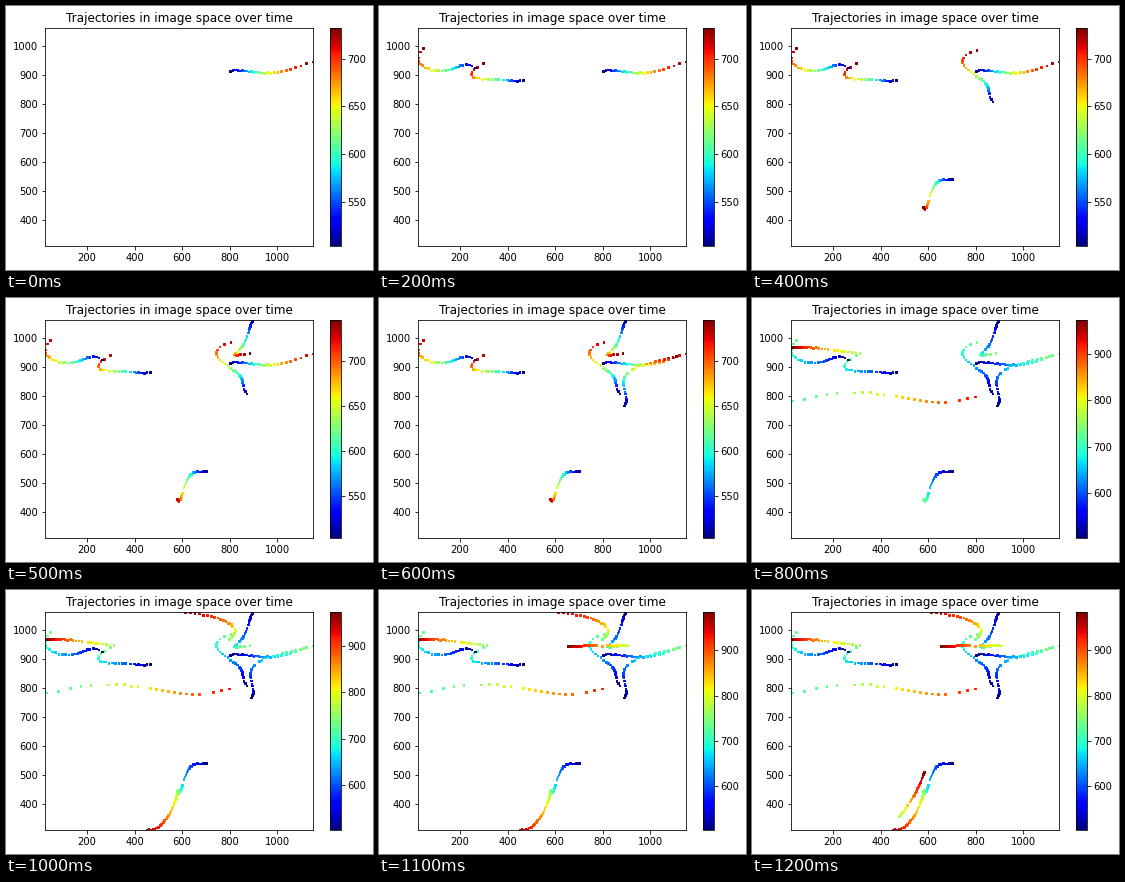
Animation, 367 px wide and 264 px high, one loop 1300 ms. Source, as a matplotlib script:

```python
import numpy as np
import matplotlib.pyplot as plt
from matplotlib.animation import FuncAnimation

W, H, DPI = 367, 264, 72
STEP_MS = 100
T_MIN = 504      # first video time on the colour scale
SAMPLE = 9       # time between two dots
DROP = 0.08      # share of missed detections
LEFT, TOP, AX_W, AX_H = 39.15, 22.2, 267.84, 217.44

plt.rcParams.update({"font.family": "DejaVu Sans", "font.size": 10})
rng = np.random.default_rng(4)


def track(t0, t1, *keys):
    """Dots along the polynomial through key points evenly spaced in time."""
    n = round((t1 - t0) / SAMPLE) + 1
    u = np.linspace(0, 1, n)
    knots = np.linspace(0, 1, len(keys))
    x, y = (np.polyval(np.polyfit(knots, v, len(keys) - 1), u)
            for v in zip(*keys))
    y = y + rng.normal(0, 1, n)
    seen = rng.random(n) > DROP
    seen[[0, -1]] = True
    return np.column_stack([x, y, t0 + (t1 - t0) * u])[seen]


tracks = [
    # approaching along each road
    track(504, 732, (800, 914), (883, 912), (979, 908), (1147, 947)),
    track(504, 732, (465, 881), (405, 881), (340, 884), (258, 893), (297, 940)),
    track(504, 732, (263, 925), (198, 931), (130, 915), (45, 930), (45, 992)),
    track(504, 732, (870, 808), (852, 850), (818, 887), (750, 931), (803, 987)),
    track(504, 732, (700, 541), (655, 538), (620, 512), (597, 458), (578, 443)),
    track(504, 745, (895, 1058), (877, 1020), (848, 970), (818, 942), (882, 946)),
    track(504, 745, (888, 767), (889, 822), (898, 876), (985, 912), (1108, 938)),
    # long sweep from left to right
    track(708, 924, (28, 782), (355, 811), (565, 785), (797, 798)),
    # leaving again
    track(755, 972, (312, 946), (140, 964), (28, 968)),
    track(740, 965, (797, 968), (817, 1007), (752, 1039), (612, 1062)),
    track(740, 972, (582, 447), (561, 393), (517, 334), (450, 311)),
    track(780, 984, (905, 945), (768, 946), (655, 944)),
    track(768, 984, (475, 354), (535, 425), (583, 510)),
]

fig = plt.figure(figsize=(W / DPI, H / DPI), dpi=DPI, facecolor="white")


def px_axes(x, w):
    return fig.add_axes([x / W, 1 - (TOP + AX_H) / H, w / W, AX_H / H])


ax = px_axes(LEFT, AX_W)
cax = px_axes(LEFT + AX_W * 1.0625, AX_H / 20)
ax.set_title("Trajectories in image space over time", fontsize=12)
ax.set_xlim(25, 1149)
ax.set_ylim(310, 1060)

x, y, t = tracks[0].T
dots = ax.scatter(x, y, c=t, s=3, marker="s", cmap="jet",
                  vmin=T_MIN, vmax=t.max())
fig.colorbar(dots, cax=cax)


def update(i):
    rows = np.vstack(tracks[:i + 1])
    dots.set_offsets(rows[:, :2])
    dots.set_array(rows[:, 2])
    dots.set_clim(T_MIN, rows[:, 2].max())
    return [dots]


anim = FuncAnimation(fig, update, frames=len(tracks), interval=STEP_MS,
                     repeat=True, repeat_delay=0, blit=False)
plt.show()
```
